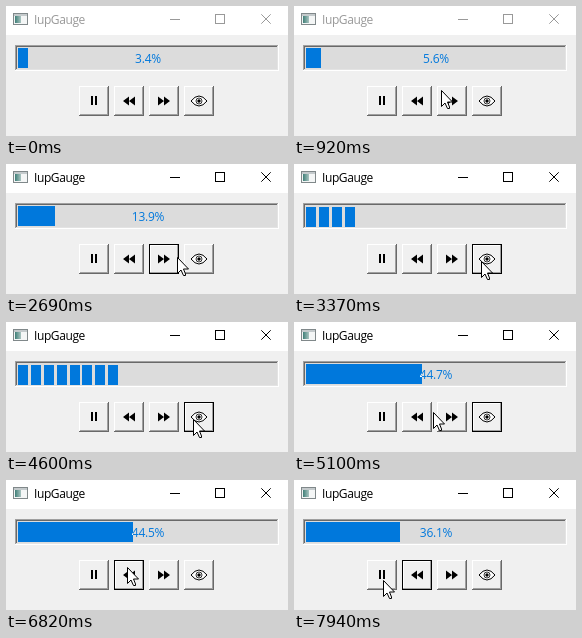
An HTML page that plays this animation: 282x130 px, repeating every 8000 ms.

```html
<!DOCTYPE html>
<html lang="en">
<head>
<meta charset="utf-8">
<title>IupGauge</title>
<style>
  html, body { margin: 0; width: 100%; height: 100%; overflow: hidden; background: #f0f0f0; }
  svg { display: block; width: 100vw; height: 100vh; }
  text { font: 12px "Open Sans", "Noto Sans", sans-serif; }
  .crisp { shape-rendering: crispEdges; }
</style>
</head>
<body>
<svg viewBox="0 0 282 130">
  <defs>
    <clipPath id="done"><rect id="doneBox" x="12" y="42" height="20"/></clipPath>
    <clipPath id="rest"><rect id="restBox" y="42" height="20"/></clipPath>
    <linearGradient id="pane"><stop stop-color="#3f7f78"/><stop offset="1" stop-color="#a9c4c0"/></linearGradient>
  </defs>

  <rect width="282" height="130" fill="#f0f0f0"/>
  <rect width="282" height="29" fill="#fff"/>

  <g class="crisp">
    <rect x="7.5" y="7.5" width="14" height="11" fill="#f4f6f6" stroke="#80888a"/>
    <rect x="8" y="8" width="13" height="2" fill="#c4cacc"/>
    <rect x="9" y="10" width="6" height="7" fill="url(#pane)"/>
  </g>
  <text id="title" x="28" y="18" letter-spacing="-.4">IupGauge</text>
  <g id="controls" fill="none">
    <path class="crisp" d="M164 13.5h10M209.5 8.5h9v9h-9z"/>
    <path d="M255.3 8.3l9.4 9.4M264.7 8.3l-9.4 9.4"/>
  </g>

  <g class="crisp">
    <rect x="9" y="39" width="264" height="26" fill="#fff"/>
    <rect x="9" y="39" width="263" height="25" fill="#a0a0a0"/>
    <rect x="10" y="40" width="262" height="24" fill="#e3e3e3"/>
    <rect x="10" y="40" width="261" height="23" fill="#696969"/>
    <rect x="11" y="41" width="260" height="22" fill="#dcdcdc"/>
    <rect id="bar" x="12" y="42" height="20" fill="#0078dc"/>
    <g id="blocks" fill="#0078dc"></g>
  </g>
  <g id="label" text-anchor="middle" letter-spacing="-.25">
    <text class="pct" x="142" y="57" fill="#0078dc" clip-path="url(#rest)"></text>
    <text class="pct" x="142" y="57" fill="#fff" clip-path="url(#done)"></text>
  </g>

  <g id="buttons"></g>
  <path id="cursor" d="M.5.5V16.5L4 13 6.5 18.5H8.5V17L6.5 12H11.5Z" fill="#fff" stroke="#000"/>
</svg>

<script>
const LOOP = 8000, REFRESH = 73.8, PHASE = 0.39;
const REWIND = 1, FORWARD = 2, SHOW = 3;
const ACTIVE_AT = 1600, HOLD = 90;
const START = 3.4, SPEED = 2.36;   // percent, percent per second
const DASH_BOOST = 1.685;          // the dashed gauge advances faster

const clicks = [
  [1900, FORWARD], [2200, FORWARD], [3340, SHOW], [4660, SHOW],
  [5520, REWIND], [6135, REWIND], [7253, REWIND]
].map(([at, button]) => ({ at, button }));

// Each move: start, end, destination
const moves = [
  [650, 910, 147, 84], [940, 1300, 160, 90], [2500, 2950, 187, 97],
  [4670, 5190, 121, 87], [7280, 7600, 89, 100]
];

const $ = id => document.getElementById(id);
const set = (el, attrs) => { for (const k in attrs) el.setAttribute(k, attrs[k]); };
const show = (el, on) => set(el, { visibility: on ? "visible" : "hidden" });

// Forward and rewind double the speed, or restart it when the direction turns
function gaugeAt(t) {
  let value = START, speed = SPEED, dashed = false, last = 0;
  const run = to => {
    value += speed * (dashed ? DASH_BOOST : 1) * (to - last) / 1000;
    last = to;
  };
  for (const { at, button } of clicks) {
    if (at > t) break;
    run(at);
    if (button === SHOW) { dashed = !dashed; continue; }
    const sign = button === FORWARD ? 1 : -1;
    speed = speed * sign > 0 ? speed * 2 : sign * SPEED;
  }
  run(t);
  return { value, dashed };
}

function pointerAt(t) {
  let x = 96, y = 135;
  for (const [from, to, px, py] of moves) {
    const u = Math.min(1, Math.max(0, (t - from) / (to - from)));
    x += (px - x) * u;
    y += (py - y) * u;
  }
  return [Math.round(x), Math.round(y)];
}

const rewind = '<path d="M-6 0L0-4.5V4.5ZM0 0L6-4.5V4.5Z"/>';
const icons = [
  '<path class="crisp" d="M-3-5h2v9h-2zM1-5h2v9h-2z"/>',
  rewind,
  `<g transform="scale(-1 1)">${rewind}</g>`,
  '<path d="M-8 0Q-4-5 0-5T8 0Q4 5 0 5T-8 0Z" fill="#fff" stroke="#000"/>' +
  '<circle r="3" fill="none" stroke="#000" stroke-width=".8"/><circle r="1.7"/>'
];

const box = (inset, cut, fill) =>
  `<rect x="${inset}" y="${inset}" width="${30 - inset - cut}" height="${30 - inset - cut}" fill="${fill}"/>`;

function bevel(focus, down) {
  if (down) return box(0, 0, "#000") + box(1, 1, "#a0a0a0") + box(2, 2, "#f0f0f0");
  if (focus) return box(0, 0, "#000") + box(1, 1, "#a0a0a0") + box(1, 2, "#fff") + box(2, 2, "#f0f0f0");
  return box(0, 0, "#696969") + box(0, 1, "#fff") + box(1, 1, "#a0a0a0") + box(1, 2, "#f0f0f0");
}

$("buttons").innerHTML = icons.map((icon, i) =>
  `<g transform="translate(${73 + 35 * i} 80)"><g class="crisp"></g><g>${icon}</g></g>`).join("");
$("blocks").innerHTML = Array.from({ length: 20 }, (_, i) =>
  `<rect x="${Math.round(12.4 + 12.8 * i)}" y="43" width="10" height="20"/>`).join("");
const buttons = [...$("buttons").children];
const blocks = [...$("blocks").children];
const labels = document.querySelectorAll(".pct");

function drawGauge(t) {
  const { value, dashed } = gaugeAt(t);
  const edge = Math.floor(13.6 + 2.565 * value);
  set($("bar"), { width: edge - 12 });
  set($("doneBox"), { width: edge - 12 });
  set($("restBox"), { x: edge, width: 271 - edge });
  show($("bar"), !dashed);
  show($("label"), !dashed);
  labels.forEach(el => el.textContent = value.toFixed(1) + "%");
  blocks.forEach((el, i) => show(el, dashed && i < Math.floor((value + 1.25) / 5)));
}

function drawWindow(t) {
  const active = t >= ACTIVE_AT;
  const ink = active ? "#000" : "#999";
  set($("title"), { fill: ink });
  set($("controls"), { stroke: ink });

  const click = clicks.filter(c => c.at - HOLD <= t).pop() || clicks[0];
  buttons.forEach((el, i) => {
    const focus = active && click.button === i;
    const down = focus && t >= click.at - HOLD && t < click.at;
    const center = down ? 16 : 15;
    el.children[0].innerHTML = bevel(focus, down);
    set(el.children[1], { transform: `translate(${center} ${center})` });
  });
}

function draw(now) {
  const step = Math.floor(now % LOOP / REFRESH - PHASE) + PHASE;
  const t = Math.max(0, step * REFRESH);
  drawGauge(t);
  drawWindow(t);
  set($("cursor"), { transform: `translate(${pointerAt(t).join(" ")})` });
}

const start = performance.now();
function tick() {
  draw(performance.now() - start);
  requestAnimationFrame(tick);
}
tick();
</script>
</body>
</html>
```
